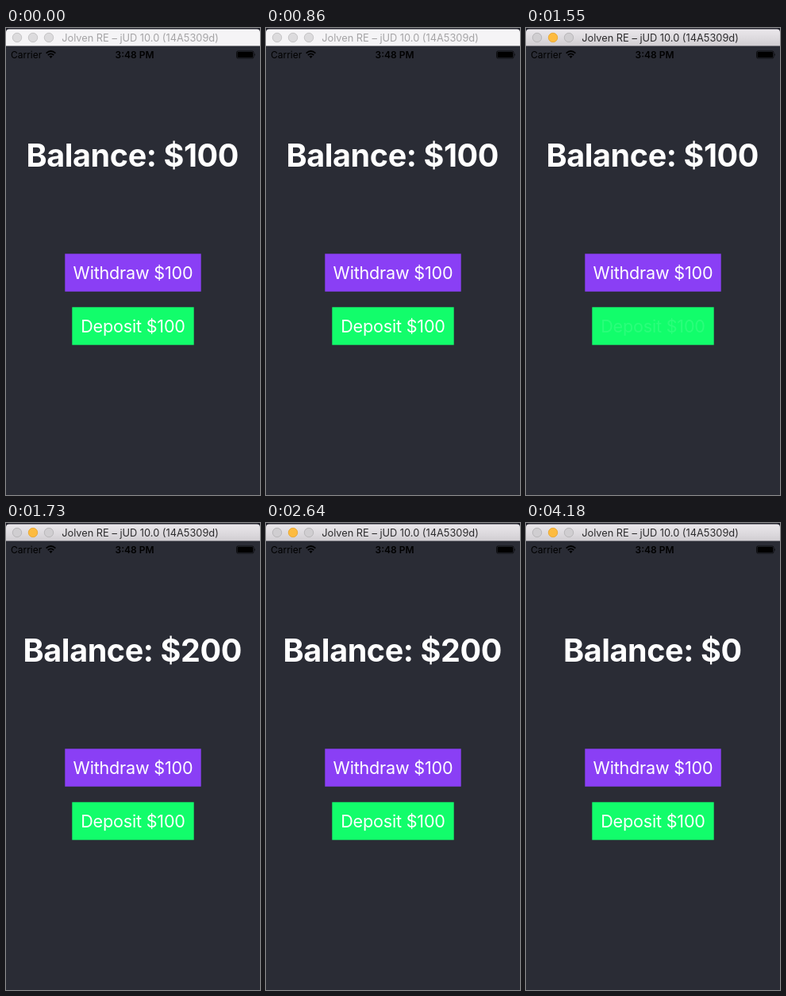
Write an HTML page that moves like this. It is 320 px wide and 586 px high and loops after 4.22 s.

```html
<!DOCTYPE html>
<html lang="en">
<head>
<meta charset="utf-8">
<title>Balance</title>
<style>
  html, body { margin: 0; width: 100%; height: 100%; overflow: hidden; background: #2a2c35; }
  svg { display: block; width: 320px; height: 586px; font-family: Inter, Roboto, sans-serif; }
  .mid { text-anchor: middle; }
  #balance { font-size: 39.5px; font-weight: 700; letter-spacing: -.4px; fill: #fff; }
  .label { font-size: 21.6px; font-weight: 400; letter-spacing: -.2px; fill: #fff; }
  .status { font-size: 12px; }
  #title { font-size: 12.8px; }
  .light { fill: #dcdbdd; stroke: #c6c5c7; }
  .active .light { fill: #d0ced1; stroke: #b9b7ba; }
  .active .amber { fill: #fdbb3f; stroke: #e9ab3a; }
</style>
</head>
<body>
<svg viewBox="0 0 320 586">
  <defs>
    <linearGradient id="chrome" x2="0" y2="1">
      <stop stop-color="#ebe8ec"/>
      <stop offset="1" stop-color="#d1ced2"/>
    </linearGradient>
  </defs>
  <rect width="320" height="586" fill="#2a2c35"/>
  <rect width="320" height="8" fill="#22222c"/>
  <g id="window">
    <path id="bar" d="M0 22.5v-17q0-4 4-4h312q4 0 4 4v17z"/>
    <circle class="light" cx="14" cy="12" r="5.7"/>
    <circle class="light amber" cx="34" cy="12" r="5.7"/>
    <circle class="light" cx="54" cy="12" r="5.7"/>
    <text id="title" class="mid" x="169" y="17">Jolven RE – jUD 10.0 (14A5309d)</text>
  </g>

  <text class="status" x="6" y="38">Carrier</text>
  <g fill="none" stroke="#000" stroke-width="1.7">
    <path d="M50.6 31.6q5.9-5.2 11.8 0M52.8 34q3.7-3.2 7.4 0"/>
    <path d="M54.4 35.6q2.1-1.8 4.2 0l-2.1 2.3z" fill="#000" stroke="none"/>
  </g>
  <text class="status mid" x="162" y="38" font-weight="600">3:48 PM</text>
  <rect x="290.5" y="29" width="21.5" height="9" rx="1.8" fill="none" stroke="#000" stroke-width=".7"/>
  <rect x="291.5" y="30" width="19.5" height="7" rx="1"/>
  <path d="M313 31.8q1.4 1.7 0 3.4z"/>

  <text id="balance" class="mid" x="159.3" y="174"></text>
  <rect x="74.3" y="283.3" width="171.4" height="47.4" fill="#8a3ff5"/>
  <text id="withdraw" class="label mid" x="160" y="315">Withdraw $100</text>
  <rect x="83.3" y="350.3" width="153.4" height="47.4" fill="#12fd6b"/>
  <text id="deposit" class="label mid" x="160" y="382">Deposit $100</text>
</svg>
<script>
  const LOOP = 4220, FOCUS = 900;
  const FADE_OUT = 60, FADE_IN = 140, DIM = 0.1;
  const taps = [
    { button: 'withdraw', down: 1072, up: 1180, change: -100 },
    { button: 'deposit', down: 1270, up: 1370, change: 100 },
    { button: 'deposit', down: 1480, up: 1590, change: 100 },
    { button: 'withdraw', down: 2740, up: 2830, change: -100 },
    { button: 'withdraw', down: 2930, up: 3020, change: -100 }
  ];
  const get = id => document.getElementById(id);
  const clamp = v => Math.min(1, Math.max(0, v));

  // Amount of highlight: rises on touch, falls after release.
  const press = (tap, t) => Math.min(clamp((t - tap.down) / FADE_OUT), 1 - clamp((t - tap.up) / FADE_IN));

  function draw(t) {
    const active = t >= FOCUS;
    get('window').setAttribute('class', active ? 'active' : '');
    get('bar').setAttribute('fill', active ? 'url(#chrome)' : '#f5f4f6');
    get('title').setAttribute('fill', active ? '#2c2b2d' : '#a5a4a6');

    const balance = taps.reduce((sum, tap) => sum + (t >= tap.up ? tap.change : 0), 100);
    get('balance').textContent = 'Balance: $' + balance;

    for (const id of ['withdraw', 'deposit']) {
      const amount = Math.max(...taps.filter(tap => tap.button === id).map(tap => press(tap, t)));
      get(id).setAttribute('opacity', 1 - (1 - DIM) * amount);
    }
  }

  const start = performance.now();
  function tick() {
    draw((performance.now() - start) % LOOP);
    requestAnimationFrame(tick);
  }
  draw(0);
  requestAnimationFrame(tick);
</script>
</body>
</html>
```
